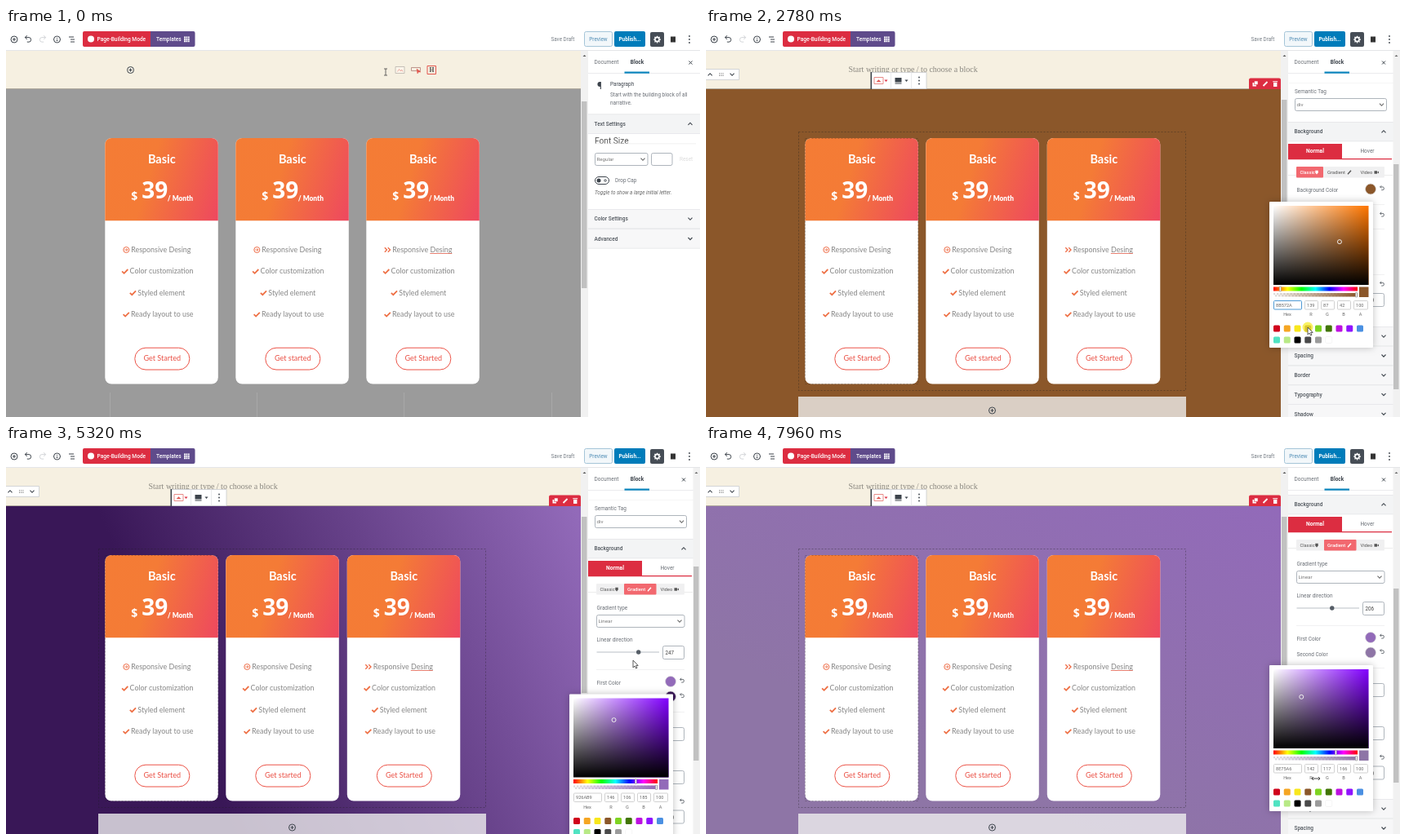
Animation of 850 by 477 pixels, one loop 7.99 s. Source, as an HTML page with a canvas:

```html
<!DOCTYPE html>
<html lang="en">
<head>
<meta charset="utf-8">
<title>Page builder</title>
<style>
  html, body { margin: 0; width: 100%; height: 100%; overflow: hidden; background: #fff; }
  canvas { display: block; }
</style>
</head>
<body>
<canvas id="stage" width="850" height="477"></canvas>
<script>
const ctx = document.getElementById('stage').getContext('2d');
const LOOP = 7990;
const RED = '#dc2d41', DARK = '#3c434b', MID = '#6a6f76', LINE = '#e4e5e8';

// Moments at which the interface changes
const SELECT = 500, EXPAND = 1100, GRADIENT = 3790;
const PICKERS = [
  { from: 1680, to: 3550, y: 197.5, color: t => flatColor(t), focus: true },
  { from: 4560, to: 5380, y: 290, color: t => firstColor(t) },
  { from: 6880, to: LOOP, y: 308.5, color: t => secondColor(t) }
];
const CLICKS = [500, 1100, 1650, 2240, 2690, 3530, 3770, 4540, 5350, 6760];
const POINTER = [
  [0, [465, 54]], [480, [650, 108]], [850, [770, 255]], [1080, [775, 277]], [1450, [792, 280]],
  [1640, [814, 198]], [1880, [759, 311]], [2230, [762, 367]], [2430, [762, 367]], [2680, [737, 367]],
  [3240, [737, 367]], [3520, [781, 198]], [3610, [782, 199]], [3760, [775, 176]], [4000, [775, 176]],
  [4500, [814, 290]], [4780, [758, 322]], [5200, [745, 338]], [5320, [768, 264]], [5560, [775, 254]],
  [5950, [731, 254]], [6010, [752, 257]], [6190, [767, 254]], [6400, [767, 254]], [6750, [809, 257]],
  [7000, [809, 257]], [7240, [781, 338]], [7680, [729, 309]], [7940, [747, 409]]
];
const HANDS = [[1580, 1760], [4420, 4640], [5540, 6420], [6700, 7060]];
const SWATCHES = ['#d0021b', '#f5a623', '#f8e71c', '#8b572a', '#7ed321', '#417505', '#bd10e0', '#9013fe',
  '#4a90e2', '#50e3c2', '#b8e986', '#000', '#4a4a4a', '#9b9b9b', '#fff'];

const mix = (a, b, k) => Array.isArray(a) ? a.map((v, i) => mix(v, b[i], k)) : a + (b - a) * k;
function track(t, keys) {
  const i = keys.findIndex(key => key[0] > t);
  if (i < 0) return keys[keys.length - 1][1];
  if (i === 0) return keys[0][1];
  const [t0, a] = keys[i - 1], [t1, b] = keys[i], k = (t - t0) / (t1 - t0);
  return mix(a, b, k * k * (3 - 2 * k));
}
const css = c => `rgb(${c.map(Math.round)})`;
function toHsv([r, g, b]) {
  const max = Math.max(r, g, b), d = max - Math.min(r, g, b);
  let h = 0;
  if (d) h = max === r ? (g - b) / d : max === g ? 2 + (b - r) / d : 4 + (r - g) / d;
  return [(h * 60 + 360) % 360, max ? d / max : 0, max / 255];
}

const flatColor = t => t < 2250 ? [155, 155, 155] : t < 2700 ? [65, 117, 5] : [139, 87, 42];
const firstColor = t => track(t, [[4820, [122, 78, 172]], [5200, [146, 106, 185]]]);
const secondColor = t => track(t, [[7240, [57, 23, 87]], [7680, [142, 117, 166]]]);
const angleAt = t => Math.round(track(t, [[5590, 247], [5950, 22], [6015, 22], [6200, 206]]));
const scrollAt = t => track(t, [[1180, -150], [1520, 0], [6430, 0], [6680, 54]]);

// Drawing helpers
function rect(x, y, w, h, fill, stroke, r = 0, lw = 1) {
  ctx.beginPath();
  ctx.roundRect(x, y, w, h, r);
  if (fill) { ctx.fillStyle = fill; ctx.fill(); }
  if (stroke) { ctx.strokeStyle = stroke; ctx.lineWidth = lw; ctx.stroke(); }
}
function disc(x, y, r, fill, stroke, lw = 1) {
  rect(x - r, y - r, 2 * r, 2 * r, fill, stroke, r, lw);
}
function icon(d, x, y, color, lw = 1, fill) {
  ctx.save();
  ctx.translate(x, y);
  const p = new Path2D(d);
  ctx.lineWidth = lw;
  ctx.strokeStyle = color;
  if (fill) { ctx.fillStyle = fill; ctx.fill(p); }
  if (lw) ctx.stroke(p);
  ctx.restore();
}
function text(s, x, y, color = MID, size = 6.4, weight = 400, font = 'Roboto, sans-serif', align = 'left') {
  ctx.font = `${weight} ${size}px ${font}`;
  ctx.fillStyle = color;
  ctx.textAlign = align;
  ctx.textBaseline = 'middle';
  ctx.fillText(s, x, y);
}
const centered = (s, x, y, color, size, weight, font = 'Roboto, sans-serif') =>
  text(s, x, y, color, size, weight, font, 'center');
function ramp(x0, y0, x1, y1, ...stops) {
  const g = ctx.createLinearGradient(x0, y0, x1, y1);
  stops.forEach(([k, c]) => g.addColorStop(k, c));
  return g;
}
// Same geometry as a CSS linear-gradient on the given box
function angled(deg, x, y, w, h, ...stops) {
  const a = deg * Math.PI / 180, dx = Math.sin(a), dy = -Math.cos(a);
  const half = (Math.abs(w * dx) + Math.abs(h * dy)) / 2, cx = x + w / 2, cy = y + h / 2;
  return ramp(cx - dx * half, cy - dy * half, cx + dx * half, cy + dy * half, ...stops);
}
function dashed(x, y, w, h, alpha) {
  ctx.setLineDash([2, 2]);
  rect(x + .5, y + .5, w, h, null, `rgba(30,30,30,${alpha})`, 0, .8);
  ctx.setLineDash([]);
}
const chevron = (x, y, up, color = DARK) =>
  icon(up ? 'M-2.5 1.3L0-1.3 2.5 1.3' : 'M-2.5-1.3L0 1.3 2.5-1.3', x, y, color, 1.1);
const cross = (x, y) => icon('M-2-2L2 2M2-2L-2 2', x, y, DARK, 1);
const undo = (x, y, color, k = 1) =>
  icon(`M${-3 * k}${-2 * k}h${4 * k}a${2 * k} ${2.3 * k} 0 0 1 0 ${4.6 * k}h${-2 * k}M${-1 * k} ${-4 * k}l${-2 * k} ${2 * k} ${2 * k} ${2 * k}`, x, y, color, 1);
function plusCircle(x, y, r = 4) {
  disc(x, y, r, null, DARK);
  icon('M-2 0H2M0-2V2', x, y, DARK, 1);
}

function topBar() {
  rect(0, 0, 850, 28, '#fff');
  rect(0, 27, 850, 1, LINE);
  plusCircle(10, 14);
  undo(27, 14, DARK, 1.2);
  ctx.save(); ctx.scale(-1, 1); undo(-45, 14, '#d3d6d9', 1.2); ctx.restore();
  disc(62.5, 14, 4, null, DARK);
  icon('M0-2V-1M0 0V2.2', 62.5, 14, DARK, 1);
  icon('M-4-3H2M-2 0H3M-2 3H3', 81, 14, DARK, 1);
  rect(94, 4, 84, 19, RED, null, [2, 0, 0, 2]);
  disc(104, 13.5, 4, '#fff');
  text('Page-Building Mode', 111.5, 14, '#fff', 6.6, 500);
  rect(177, 4, 54.5, 19, '#5f4b8b', null, [0, 2, 2, 0]);
  text('Templates', 184, 14, '#fff', 6.5, 500);
  for (let i = 0; i < 9; i++) rect(218 + i % 3 * 2.4, 10.5 + (i / 3 | 0) * 2.4, 1.9, 1.9, '#fff');
  text('Save Draft', 667.5, 14, '#777e86', 6.3);
  rect(708.5, 4.5, 34, 18, '#f2f7fa', '#a5c5d8', 2);
  centered('Preview', 725.5, 14, '#4f8db5', 6.4);
  rect(745, 4, 38, 19, '#007cba', null, 2);
  centered('Publish...', 764, 14, '#fff', 6.4, 700);
  rect(789, 5, 17, 18, '#464d56', null, 2);
  disc(797.5, 14, 2.6, null, '#fff', 1.6);
  for (let i = 0; i < 8; i++) {
    const a = i * Math.PI / 4;
    rect(797 + 3.8 * Math.cos(a), 13.5 + 3.8 * Math.sin(a), 1.2, 1.2, '#fff');
  }
  rect(814, 10.5, 6, 7, '#333');
  [10, 14, 18].forEach(y => disc(837, y, .9, DARK));
}

function card(x, index) {
  const lato = 'Lato, sans-serif', openSans = '"Open Sans", sans-serif';
  rect(x, 135, 138.5, 301.5, '#fff', null, 8);
  rect(x, 135, 138.5, 101.3, angled(107, x, 135, 138.5, 101.3, [0, '#f47c35'], [.4, '#f47b36'], [1, '#ee485f']), null, [8, 8, 0, 0]);
  centered('Basic', x + 69.5, 162, '#fff', 14.5, 700, lato);
  text('$', x + 32, 207.5, '#fff', 14, 700, openSans);
  text('39', x + 45, 202, '#fff', 28, 700, openSans);
  text('/ Month', x + 76.5, 209.5, '#fff', 8.3, 900, lato);
  const rows = [['Responsive Desing', 32], ['Color customization', 30.3], ['Styled element', 40], ['Ready layout to use', 31.8]];
  rows.forEach(([label, dx], i) => {
    const y = 272 + i * 26.4, ix = x + dx - 6;
    text(label, x + dx, y, '#868686', 8.9, 400, lato);
    if (i) icon('M-3.5 0L-1 2.4 3.7-2.4', ix, y, '#ee7045', 1.8);
    else if (index === 2) icon('M-3.5-2.7L-.8 0-3.5 2.7M.5-2.7L3.2 0 .5 2.7', ix, y, '#ee6b45', 1.3);
    else {
      disc(ix, y, 3.5, null, '#ee6b45');
      icon('M-2 0H1.6M0-1.6L1.7 0 0 1.6', ix, y, '#ee6b45', .9);
    }
  });
  if (index === 2) rect(x + 78, 276, 27, .8, '#e0604f');
  rect(x + 36.5, 392.2, 67, 26.8, '#fff', '#ec5347', 13.2, 1);
  centered(index === 1 ? 'Get started' : 'Get Started', x + 70, 405.5, '#ea4f44', 9, 400, lato);
}

function page(t) {
  const selected = t >= SELECT;
  rect(0, 28, 705, 47, '#f6f0e1');
  const fill = t < GRADIENT ? css(flatColor(t))
    : angled(angleAt(t), 0, 75, 705, 430, [.01, css(firstColor(t))], [.67, css(secondColor(t))]);
  rect(0, 75, 705, 402, fill);
  rect(0, 74, 705, 1, 'rgba(110,105,95,.5)');
  if (selected) {
    text('Start writing or type / to choose a block', 174.5, 51.5, '#8b8880', 10, 400, '"Liberation Serif", serif');
    dashed(113, 127, 474, 317, .45);
    rect(113, 452, 475, 25, 'rgba(241,241,241,.78)');
    plusCircle(350.5, 469);
  } else {
    plusCircle(152.5, 51.5);
    rect(477, 47.5, 11, 8, '#fbf5ea', '#b9b4ac', 0, .8);
    icon('M-3 1.5L-1-1.5 1 1 2-1 3.5 1.5', 482.5, 52, '#e99a91', .8);
    rect(496.5, 48.5, 11, 4, null, '#b07f78', 0, .8);
    icon('M0-3L5 1 2 1 1 3Z', 503, 53, '#e2574e', .5, '#e2574e');
    rect(516, 46.5, 10.5, 10, null, '#e2574e', 0, 1);
    centered('H', 521.3, 52, '#444', 7.5, 700, '"Liberation Serif", serif');
    [127, 307, 487, 668].forEach(x => rect(x, 447, 1, 30, 'rgba(255,255,255,.13)'));
  }
  (selected ? [121.3, 269.3, 417.8] : [121.3, 281.3, 441.3]).forEach(card);
  if (selected) {
    dashed(121, 135, 138.5, 301, .35);
    blockToolbars();
  }
  rect(704, 28, 9, 449, '#f1f1f1');
  icon('M-2 1L0-1 2 1Z', 708.5, 34, '#555', 0, '#555');
  rect(705, selected ? 88 : 90, 6.5, selected ? 216 : 229, '#c1c1c1');
}

function blockToolbars() {
  rect(-1, 50.5, 41.5, 13, '#fff', '#c9ccd0', 0, .8);
  chevron(5, 57, true);
  for (let i = 0; i < 6; i++) rect(16 + i % 3 * 2.2, 55.2 + (i / 3 | 0) * 2.4, 1.1, 1.1, '#777');
  chevron(32, 57, false);
  rect(202.5, 54.5, 67.5, 20, '#fff', '#c9ccd0', 0, .8);
  rect(201.5, 54, 1.6, 21, DARK);
  rect(226, 54.5, .8, 20, LINE);
  rect(251, 54.5, .8, 20, LINE);
  rect(206, 60.5, 11, 8, null, '#e88b88', 0, 1);
  icon('M-3 1.5L0-1.5 3 1.5Z', 211.5, 64.7, '#e05a55', 0, '#e05a55');
  [220.5, 245.5].forEach((x, i) => icon('M-2-1H2L0 1.4Z', x, 64.5, DARK, 0, i ? DARK : RED));
  rect(231.5, 61, 8, 5.5, DARK);
  rect(231.5, 67.5, 8, 1, DARK);
  [60.5, 64.5, 68.5].forEach(y => disc(261, y, .9, DARK));
  rect(665, 61.5, 39, 13.5, RED, null, [2, 2, 0, 0]);
  rect(669.5, 67, 4.5, 4.5, '#fff');
  rect(671.5, 65, 4.5, 4.5, '#fff', RED, 0, .6);
  icon('M-2.5 2.5L2.5-2.5', 685, 68.5, '#fff', 1.8);
  rect(695, 67, 4.4, 5, '#fff');
  rect(694.3, 65.2, 5.8, 1.1, '#fff');
}

// Sidebar parts
function panelHeader(label, y, open, chevronX = 830, right = 842) {
  rect(713, y - 12, right - 713, 24, open ? '#f3f4f5' : '#f7f7f8');
  rect(713, y - 12, right - 713, .8, LINE);
  rect(713, y + 11.5, right - 713, .8, LINE);
  text(label, 720.5, y + .5, '#50565d', 6.5, 500);
  chevron(chevronX, y, open);
}
function select(value, x, y, w) {
  rect(x + .5, y - 7.5, w, 15, '#fff', '#9aa2ab', 2, .8);
  text(value, x + 2.5, y + .5, '#777', 6.2);
  chevron(x + w - 5.5, y, false, '#666');
}
function toggle(x, y) {
  rect(x + .5, y - 4.5, 17, 9, '#fff', DARK, 4.5, 1);
  disc(x + 5, y, 2.5, DARK);
  disc(x + 13, y, 1.3, null, DARK, .8);
}
function slider(value, max, y) {
  rect(723.5, y - .5, 76.5, 1, '#b9bfc5');
  disc(727 + value / max * 69.5, y, 2.7, '#555d66');
  rect(804.5, y - 7.5, 26, 16, '#fff', '#9aa2ab', 2, .8);
  text(value, 807.5, y + 1.2, '#444', 6.3);
}
function colorRow(label, y, color, dy = 1.7) {
  text(label, 723.5, y + dy);
  disc(814, y, 6.5, color, '#ddd', .7);
  undo(828, y - 1, MID, .8);
}
const separator = y => rect(723, y, 108, .7, '#ededee');

function classicPanel(t) {
  colorRow('Background Color', 197.5, css(flatColor(t)));
  separator(216);
  text('Background Image', 723.5, 233);
  rect(782, 230, 6, 4, null, DARK, 0, .8);
  rect(784, 235.2, 2, 1, DARK);
  rect(792, 230, 4, 6, null, DARK, .5, .8);
  rect(801, 231, 5, 4, null, DARK, .5, .8);
  rect(812.3, 230, 3, 6, null, DARK, .5, .8);
  undo(828, 229, MID, .8);
  separator(246);
  rect(723.5, 257, 64.5, 16, '#fff', '#777', 1, .9);
  text('Choose an image', 728.5, 265.5, '#555', 6);
  rect(777.5, 262, 5.5, 5.5, DARK);
  icon('M-2 1.5L0-1 2.2 1.5Z', 780.2, 265, '#fff', 0, '#fff');
  toggle(723, 284.5);
  text('Parallax Effect', 749, 285, DARK);
  separator(302);
  text('Opacity(%)', 723.5, 317.5);
  undo(828, 314, MID, .8);
  slider(100, 100, 333);
}

function gradientPanel(t) {
  text('Gradient type', 723.5, 200);
  select('Linear', 723, 216, 107.5);
  text('Linear direction', 723.5, 239);
  slider(angleAt(t), 360, 254);
  if (t > 5900 && t < 6225) [731, 738, 749].forEach((x, i) => {
    ctx.globalAlpha = .5;
    disc(x, 254.5, 6, i ? '#ebe5a0' : '#d2d2de');
    ctx.globalAlpha = 1;
  });
  separator(275);
  colorRow('First Color', 290, css(firstColor(t)), 2.3);
  colorRow('Second Color', 308.5, css(secondColor(t)), 2.3);
  separator(327);
  text('Start position', 723.5, 339);
  slider(1, 100, 354);
  text('End position', 723.5, 392);
  slider(67, 100, 407);
  text('Opacity(%)', 723.5, 441);
  undo(828, 437, MID, .8);
  slider(100, 100, 455.5);
}

function sectionSidebar(t) {
  const open = t >= EXPAND, gradient = t >= GRADIENT;
  icon('M-4-4H4V4H-4ZM-4-1H4M0-1V4', 727, -79, DARK, 1);
  text('Section', 740, -81, DARK);
  text('Container for rows and columns.', 740, -68);
  panelHeader('Section Settings', -33, true);
  text('Content Width', 721, -11);
  select('Boxed', 721, 4, 112);
  text('Columns Gap', 721, 27);
  select('Default', 721, 43, 112);
  rect(714, 67, 128, .7, '#f2f2f2');
  text('Semantic Tag', 721, 78);
  select('div', 721, 94, 112);
  panelHeader('Background', 127, open);
  if (open) {
    rect(713, 142, 66, 18.5, RED);
    rect(713, 160, 127, 1.2, RED);
    centered('Normal', 746, 151.5, '#fff', 6.6, 700);
    centered('Hover', 810, 151.5, MID, 6.5);
    rect(713, 180, 128, .8, '#e6e6e6');
    rect(723, 170, 108, 13.5, '#f0f0f1', null, 1);
    rect(gradient ? 757 : 723, 170, gradient ? 39.5 : 33, 13.5, '#f2686f', null, 1);
    const tint = on => on ? '#fff' : '#555';
    text('Classic', 727.5, 177.3, tint(!gradient), 5.6, gradient ? 400 : 500);
    icon('M-1.7-2.2H1.7V.6L0 2.5-1.7.6Z', 748, 177, '#000', 0, tint(!gradient));
    text('Gradient', 761, 177.3, tint(gradient), 5.8, gradient ? 500 : 400);
    icon('M-2 2.2L2-2.2', 788, 177, tint(gradient), 1.4);
    text('Video', 801.5, 177.3, '#555', 5.8);
    icon('M-2.5-1.7H1V1.7H-2.5ZM1 0L3-1.5V1.5Z', 821, 177, '#555', 0, '#555');
    (gradient ? gradientPanel : classicPanel)(t);
  }
  const next = !open ? 151 : gradient ? 500 : 378;
  ['Overlay', 'Spacing', 'Border', 'Typography', 'Shadow', 'Advanced']
    .forEach((label, i) => panelHeader(label, next + i * 23.8, false));
}

function paragraphSidebar() {
  centered('¶', 727, 71, DARK, 12);
  text('Paragraph', 740, 69.5, DARK);
  text('Start with the building block of all', 740, 82.5);
  text('narrative.', 740, 92);
  panelHeader('Text Settings', 117.5, true, 838, 850);
  text('Font Size', 721, 138.5, '#555', 10.2);
  rect(721, 141.5, 124, .7, '#ececec');
  select('Regular', 721, 161, 64.5);
  rect(790.5, 153.5, 25.5, 15, '#fff', '#9aa2ab', 2, .8);
  text('Reset', 825, 161.5, '#dcdcdc');
  toggle(721, 187);
  text('Drop Cap', 746, 187.5);
  text('Toggle to show a large initial letter.', 721, 202, '#666', 6.3, 'italic');
  panelHeader('Color Settings', 234, false, 838, 850);
  panelHeader('Advanced', 258.3, false, 838, 850);
}

function sidebar(t) {
  const selected = t >= SELECT, scroll = scrollAt(t);
  rect(713, 28, 137, 449, '#fff');
  ctx.save();
  ctx.beginPath();
  ctx.rect(713, 57, 137, 420);
  ctx.clip();
  if (selected) {
    ctx.translate(0, -scroll);
    sectionSidebar(t);
  } else paragraphSidebar();
  ctx.restore();
  centered('Document', 735.5, 42.5, MID, 6.5);
  centered('Block', 773, 42.5, DARK, 6.5, 700);
  rect(713, 55.3, 137, .8, LINE);
  rect(757.5, 53.5, 30.5, 2.2, '#0a85bd');
  cross(selected ? 830 : 838.5, 42.5);
  if (selected) {
    rect(841.5, 28, 8.5, 449, '#f1f1f1');
    icon('M-2 1L0-1 2 1Z', 845.5, 34, '#666', 0, '#666');
    if (t < GRADIENT) rect(842, 167 + .7 * scroll, 6.5, 276, '#c1c1c1');
    else rect(842, 149 + .5 * scroll, 6.5, 238, '#c1c1c1');
  }
}

function picker({ from, y: swatchY, color, focus }, t) {
  const rgb = color(t).map(Math.round), [h, s, v] = toHsv(rgb);
  const sy = swatchY - scrollAt(t), y = sy + 15.5;
  const k = Math.min(1, (t - from) / 100), scale = 1 - (1 - k) ** 2;
  ctx.save();
  ctx.translate(811, sy + 4.5);
  ctx.scale(scale, scale);
  ctx.translate(-811, -sy - 4.5);
  ctx.shadowColor = 'rgba(0,0,0,.25)';
  ctx.shadowBlur = 8;
  rect(690, y, 127, 179, '#fff', null, 1);
  ctx.shadowColor = 'transparent';

  rect(695, y + 5, 116.5, 97, ramp(695, 0, 811, 0, [0, '#fff'], [1, `hsl(${h} 100% 50%)`]));
  rect(695, y + 5, 116.5, 97, ramp(0, y + 5, 0, y + 102, [0, 'rgba(0,0,0,0)'], [1, '#000']));
  disc(695 + s * 116, y + 5 + (1 - v) * 97, 2.5, null, '#eee', 1);

  const hues = [0, 1, 2, 3, 4, 5, 6].map(i => [i / 6, `hsl(${i * 60} 100% 50%)`]);
  rect(695, y + 104.5, 103, 5, ramp(695, 0, 798, 0, ...hues));
  rect(694.5 + h / 360 * 101, y + 104, 2, 6, '#fff', '#777', 0, .5);
  for (let i = 0; i < 50; i++) rect(695 + i * 2.06, y + 112 + i % 2 * 2.2, 2.06, 2.2, '#ddd');
  rect(695, y + 112, 103, 4.5, ramp(695, 0, 798, 0, [0, `rgba(${rgb},0)`], [1, css(rgb)]));
  rect(795.5, y + 111.5, 2, 5.5, '#fff', '#777', 0, .5);
  rect(800, y + 104.5, 11.5, 12.5, css(rgb));

  const hex = rgb.map(n => n.toString(16).padStart(2, '0')).join('').toUpperCase();
  const fields = [['Hex', hex, 695, 34], ['R', rgb[0], 733, 16], ['G', rgb[1], 753, 16], ['B', rgb[2], 773, 16], ['A', 100, 793, 17]];
  fields.forEach(([label, value, x, w], i) => {
    rect(x + .5, y + 121.5, w, 10.5, '#fff', focus && !i ? '#3b8fd0' : '#ccc', 1, .9);
    text(value, x + 3, y + 127.3, '#666', 5.6);
    centered(label, x + w / 2, y + 138.7, '#666', 5.6);
  });
  SWATCHES.forEach((c, i) =>
    rect(695 + i % 9 * 12.75, y + 151.5 + (i / 9 | 0) * 14, 8, 8, c, c === '#fff' ? '#eee' : null, 1.5, .6));
  ctx.restore();
}

function pointer(t) {
  const [x, y] = track(t, POINTER);
  if (CLICKS.some(c => t >= c && t < c + 130)) {
    ctx.globalAlpha = .75;
    disc(x, y, 6.5, '#f7ee2e');
    ctx.globalAlpha = 1;
  }
  if (t < 220) icon('M-2-4H2M0-4V4M-2 4H2', x, y, '#444', .8);
  else if (t > 7800) icon('M-5 0H5M-3-2L-5 0-3 2M3-2L5 0 3 2', x, y, '#333', .9);
  else if (HANDS.some(([a, b]) => t >= a && t < b))
    icon('M-1 4V-1Q0-2 1-1V3L4 4V7L3 9H-1L-4 5Q-3 3-1 5Z', x, y, '#222', .8, '#fff');
  else icon('M0 0V9L2 7 3.5 10 5 9.3 3.6 6.4H6.2Z', x, y, '#333', .8, '#fff');
}

function frame(now) {
  const t = now % LOOP;
  page(t);
  topBar();
  sidebar(t);
  PICKERS.forEach(p => { if (t > p.from && t < p.to) picker(p, t); });
  pointer(t);
}

const start = performance.now();
function tick() {
  frame(performance.now() - start);
  requestAnimationFrame(tick);
}
tick();
</script>
</body>
</html>
```
